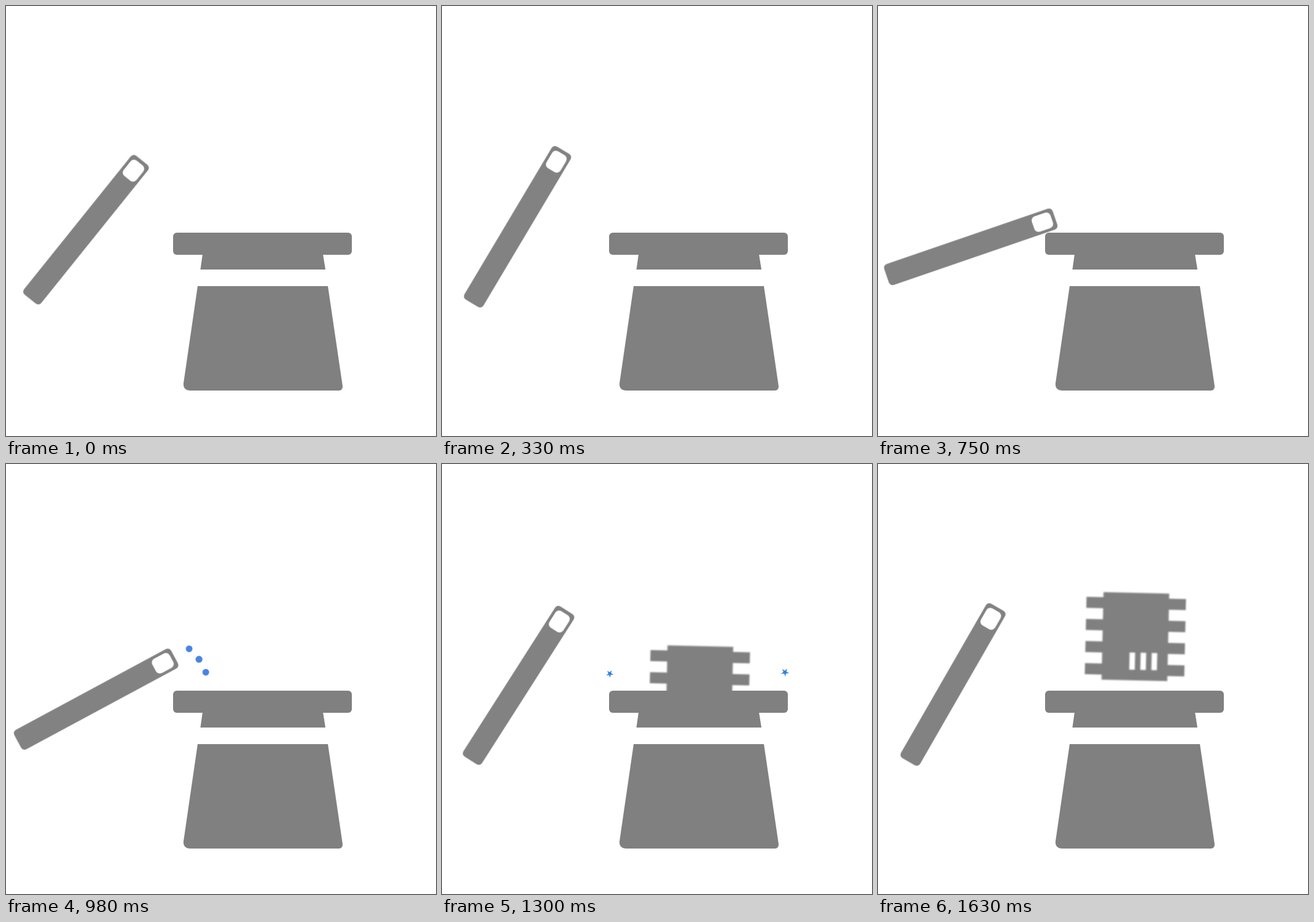
Animation, 700 px wide and 700 px high, one loop 2520 ms. Source, as an HTML page:

```html
<!DOCTYPE html>
<html lang="en">
<head>
<meta charset="utf-8">
<title>Magic hat</title>
<style>
  html, body { margin: 0; width: 100%; height: 100%; overflow: hidden; background: #fff; }
  svg { display: block; width: 100%; height: 100%; }
  .wand, .hat, .chip, .spark, .star { animation: 2520ms linear infinite; }
  .grey { fill: #808080; }
  .white { fill: #fff; }

  .wand { animation-name: wave; }
  @keyframes wave {
    0%, 1.19% { transform: translate(92.5px, 414px) rotate(-51.2deg); }
    12.7% { transform: translate(92.5px, 414px) rotate(-60.1deg); }
    13.1% { transform: translate(92.5px, 414px) rotate(-59.3deg); }
    21.83% { transform: translate(92.5px, 414px) rotate(-38.4deg); }
    29.76% { transform: translate(92.5px, 414px) rotate(-19deg); }
    32.14% { transform: translate(92.5px, 414px) rotate(-16.3deg); }
    34.33% { transform: translate(92.5px, 414px) rotate(-17.7deg); }
    38.89% { transform: translate(92.5px, 414px) rotate(-28.2deg); }
    46.83% { transform: translate(92.5px, 414px) rotate(-46.4deg); }
    52.78%, 100% { transform: translate(92.5px, 414px) rotate(-60.1deg); }
  }

  .hat { animation-name: tap; }
  @keyframes tap {
    0%, 30.2% { transform: none; }
    32.14% { transform: translate(3px, 5px); }
    34.9%, 100% { transform: none; }
  }

  .spark { fill: #4a83e2; animation-name: burst; }
  @keyframes burst {
    0%, 34.52% { transform: translate(275px, 345px) scale(0); }
    38.89% { transform: translate(calc(275px + var(--x)), calc(345px + var(--y))) scale(1); }
    43.65%, 100% { transform: translate(calc(275px + 1.5 * var(--x)), calc(345px + 1.5 * var(--y))) scale(0); }
  }

  .chip { animation-name: rise; }
  @keyframes rise {
    0%, 46.83% { transform: translate(419px, 460px) rotate(1.3deg); }
    55.56% { transform: translate(419px, 292px) rotate(1.3deg); }
    59.5% { transform: translate(419px, 272.5px) rotate(1.3deg); }
    64.68%, 100% { transform: translate(419px, 281px) rotate(1.3deg); }
  }

  .star { fill: #2f80e0; animation-name: fly; }
  @keyframes fly {
    0%, 49.6% { transform: translate(var(--a)) scale(0); }
    55.56% { transform: translate(var(--b)) scale(1); }
    64.3%, 100% { transform: translate(var(--c)) scale(0); }
  }
</style>
</head>
<body>
<svg viewBox="0 0 700 700">
  <defs>
    <clipPath id="above"><rect width="700" height="380"/></clipPath>
  </defs>

  <g clip-path="url(#above)">
    <g class="chip" style="filter: blur(1px)">
      <path class="grey" d="M-53.5-71.3h107v142.6h-107z
        M-81-63h162v18h-162z M-81-27h162v18h-162z M-81 9h162v18h-162z M-81 45h162v18h-162z"/>
      <path class="white" d="M-8.8 26h9v28h-9z M9.2 26h9v28h-9z M27.2 26h9v28h-9z"/>
    </g>
  </g>

  <g class="hat grey">
    <rect x="272" y="369" width="291" height="36" rx="6"/>
    <path d="M320 404H516L520 429H316.5z"/>
    <path d="M312 456H524L548 619Q548 626 542 626H299Q288 625 289 614z"/>
  </g>

  <g class="wand">
    <rect fill="#828282" x="-82.5" y="-19.8" width="290" height="36" rx="6.5"/>
    <rect class="white" x="169.8" y="-15" width="32" height="26.4" rx="7"/>
  </g>

  <circle class="spark" r="5.5" style="--x:23px; --y:-44px"/>
  <circle class="spark" r="5.7" style="--x:39px; --y:-27px"/>
  <circle class="spark" r="5.5" style="--x:50px; --y:-6px"/>

  <path class="star" data-r="18.5" style="--a:285px,355px; --b:250px,315px; --c:237px,327px"/>
  <path class="star" data-r="20.5" style="--a:546px,354px; --b:582px,310px; --c:592px,322px"/>
</svg>
<script>
  // Five-pointed star outline around the origin
  function starPath(r) {
    const points = Array.from({ length: 10 }, (_, i) => {
      const angle = (i * 36 - 131) * Math.PI / 180;
      const d = i % 2 ? r * 0.37 : r;
      return (d * Math.cos(angle)).toFixed(2) + ' ' + (d * Math.sin(angle)).toFixed(2);
    });
    return 'M' + points.join('L') + 'Z';
  }
  for (const star of document.querySelectorAll('.star')) {
    star.setAttribute('d', starPath(+star.dataset.r));
  }
</script>
</body>
</html>
```
